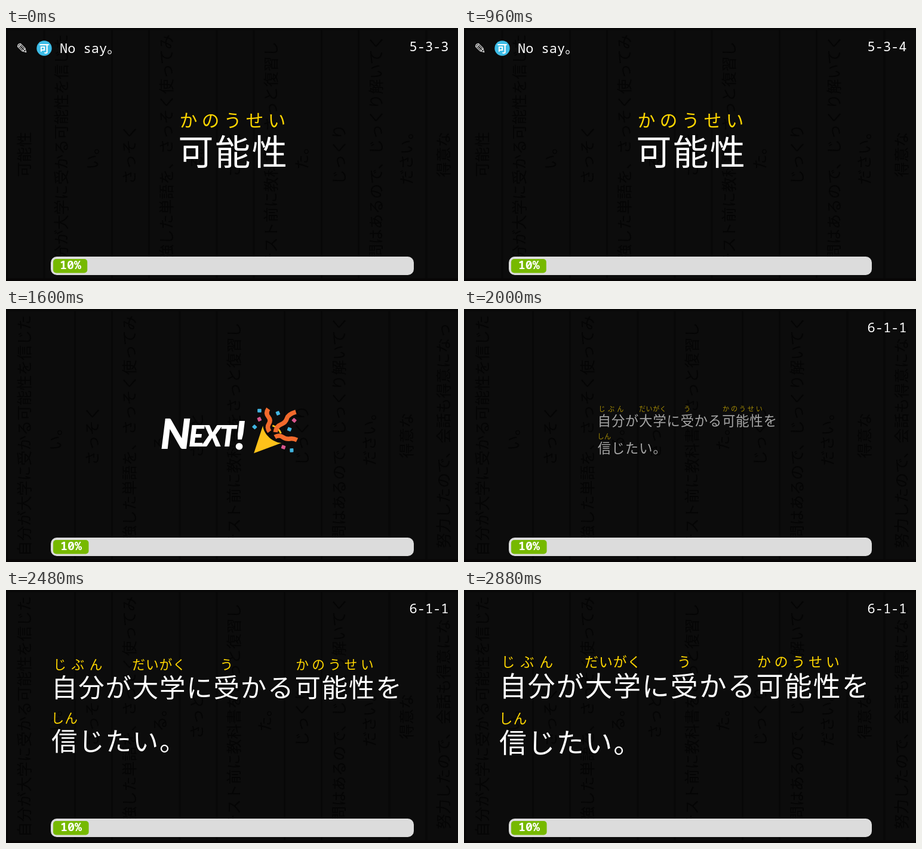
An HTML page for the animation above (3.16 s loop, 757 px wide and 425 px high).

```html
<!DOCTYPE html>
<html lang="ja">
<head>
<meta charset="utf-8">
<title>Vocabulary cards</title>
<style>
  html, body { margin: 0; width: 100%; height: 100%; overflow: hidden; background: #0c0c0c; }
  svg { display: block; }
  text { font-family: 'Noto Sans CJK JP', 'Noto Sans CJK', sans-serif; fill: #fff; white-space: pre; }
  .mid { text-anchor: middle; }
  .base { font-weight: 500; }
  .read { fill: #ffd700; }
  .mono { font: 22px 'Noto Sans Mono', 'Noto Sans CJK JP', monospace; }
  .pencil { font: 24px 'DejaVu Sans', sans-serif; }
  .brush { font: italic 900 49px Lato, sans-serif; letter-spacing: -3px; }
  #shelf rect { fill: none; stroke: #080808; stroke-width: 3; }
  #shelf text { font-size: 25.3px; fill: #050505; }
</style>
</head>
<body>
<svg width="757" height="425" viewBox="0 0 757 425">
  <rect width="757" height="425" fill="#0c0c0c"/>
  <g id="shelf"></g>
  <rect y="421" width="757" height="4" fill="#070505"/>

  <g id="card">
    <text class="pencil" x="17" y="43">✎</text>
    <circle cx="64" cy="34" r="12.7" fill="#3dbce6"/>
    <text class="mid" x="64" y="40.5" font-size="17" font-weight="900">可</text>
    <text class="mono" x="90" y="42">No say。</text>
  </g>

  <g id="next">
    <g transform="translate(378.5 212.5) scale(1.195) translate(-378.5 -212.5)">
      <text class="brush" y="232"><tspan x="259" y="235" font-size="70">N</tspan><tspan x="306" y="231">EXT</tspan><tspan x="383" y="236" font-size="66">!</tspan></text>
      <path d="M415 242L430 196C431 210 446 224 461 225Z" fill="#ffc21a"/>
      <path d="M446 196Q456 199 460 209" fill="none" stroke="#ffc21a" stroke-width="3"/>
      <path d="M439 168q-5 7 0 13t1 12t1 13M451 207q1-10 9-13t10-10t15-11M450 215q7-4 13 0t12 3t12 2"
            fill="none" stroke="#f26a2c" stroke-width="7.5"/>
      <g id="confetti"></g>
    </g>
  </g>

  <g id="sentence"></g>
  <text id="counter" class="mono" x="675.5" y="39"></text>

  <rect x="75" y="384" width="608" height="31" rx="10" fill="#dcdcdc"/>
  <rect id="bar" x="79" y="388" height="23.5" rx="5" fill="#76b900"/>
  <text id="percent" class="mono mid" y="404.5" style="font-size:20px;font-weight:700">10%</text>
</svg>
<script>
const LOOP = 3160, CX = 378.5, CY = 212.5;
const $ = id => document.getElementById(id);
const clamp = v => Math.min(1, Math.max(0, v));
const ramp = (t, from, to) => clamp((t - from) / (to - from));

// Evenly spaced characters centred on (cx, cy)
function glyphs(str, cx, cy, size, pitch, cls) {
  const xs = [...str].map((_, i) => (cx + (i - (str.length - 1) / 2) * pitch).toFixed(1));
  return `<text class="mid ${cls}" x="${xs.join(' ')}" y="${(cy + size * .38).toFixed(1)}" font-size="${size}">${str}</text>`;
}

// Words separated by spaces, each "base" or "base|reading"
function rubyLine(line, x, cy, em) {
  return line.split(' ').map(word => {
    const [base, read] = word.split('|'), width = base.length * em, cx = x + width / 2;
    x += width;
    const out = glyphs(base, cx, cy, em * .96, em, 'base');
    return read
      ? out + glyphs(read, cx, cy - em * .85, em * .48, Math.max(em / 2, width / read.length), 'read')
      : out;
  }).join('');
}

$('card').innerHTML += rubyLine('可能性|かのうせい', 287, 207.5, 61.7);
$('sentence').innerHTML =
  rubyLine('自分|じぶん が 大学|だいがく に 受|う かる 可能性|かのうせい を', 58.1, 160.5, 47.8) +
  rubyLine('信|しん じたい。', 58.1, 255.5, 47.8);

// Faint sideways columns: a word, then its sentence on two lines
const shelf = [
  ['可能性'], ['自分が大学に受かる可能性を信じた', 'い。'],
  ['さっそく'], ['勉強した単語を、さっそく使ってみ', 'る。'],
  ['さっと'], ['テスト前に教科書をさっと復習し', 'た。'],
  ['じっくり'], ['疑問はあるので、じっくり解いてく', 'ださい。'],
  ['得意な'], ['努力したので、会話も得意になっ', 'た。']
];
let left = 2;
$('shelf').innerHTML = shelf.map(lines => {
  const width = lines.length > 1 ? 113.5 : 62, x = left;
  left += width;
  return `<rect x="${x}" y="2" width="${width}" height="420"/>` + lines.map((line, i) =>
    `<text class="mid" dy=".38em" transform="translate(${x + 28.5 + i * 51.5} ${CY}) rotate(-90)">${line}</text>`).join('');
}).join('');

const BLUE = '#41b5e2', PINK = '#d9578f';
$('confetti').innerHTML = [
  [424, 171, BLUE], [455, 175, BLUE], [416, 198, BLUE], [474, 202, BLUE], [478, 237, BLUE],
  [424, 185, PINK], [482, 187, PINK], [464, 232, PINK]
].map(([x, y, fill], i) =>
  `<rect x="-3" y="-3" width="6.5" height="6" rx="1" fill="${fill}" transform="translate(${x} ${y}) rotate(${i * 67 % 90})"/>`).join('');

// cubic-bezier(.25, .1, .25, 1)
function ease(p) {
  p = clamp(p);
  let lo = 0, hi = 1;
  for (let i = 0; i < 20; i++) {
    const u = (lo + hi) / 2;
    if (.75 * u * (1 - u) + u ** 3 < p) lo = u; else hi = u;
  }
  const u = (lo + hi) / 2;
  return .3 * u * (1 - u) ** 2 + 3 * u * u * (1 - u) + u ** 3;
}

function zoomIn(el, p) {
  const s = .3 + .7 * ease(p);
  el.setAttribute('transform', `translate(${CX} ${CY}) scale(${s}) translate(${-CX} ${-CY})`);
  el.setAttribute('opacity', p > 0 ? ease(2 * p) : 0);
}

const show = (el, on) => { el.style.display = on ? '' : 'none'; };

function draw(now) {
  const t = now % LOOP, carded = t < 1150, celebrating = !carded && t < 1795;
  show($('card'), carded);
  show($('next'), celebrating);
  zoomIn($('next'), (t - 1130) / 1000);
  zoomIn($('sentence'), (t - 1815) / 1000);
  $('shelf').setAttribute('transform', `translate(${carded ? 0 : -62} 0)`);
  $('counter').textContent = t < 590 ? '5-3-3' : carded ? '5-3-4' : celebrating ? '' : '6-1-1';
  const width = 57.2 + .6 * ramp(t, 0, 160) + ramp(t, 560, 960) + .8 * ramp(t, 1150, 1680);
  $('bar').setAttribute('width', width);
  $('percent').setAttribute('x', 79.3 + width / 2);
  requestAnimationFrame(draw);
}
draw(0);
</script>
</body>
</html>
```
